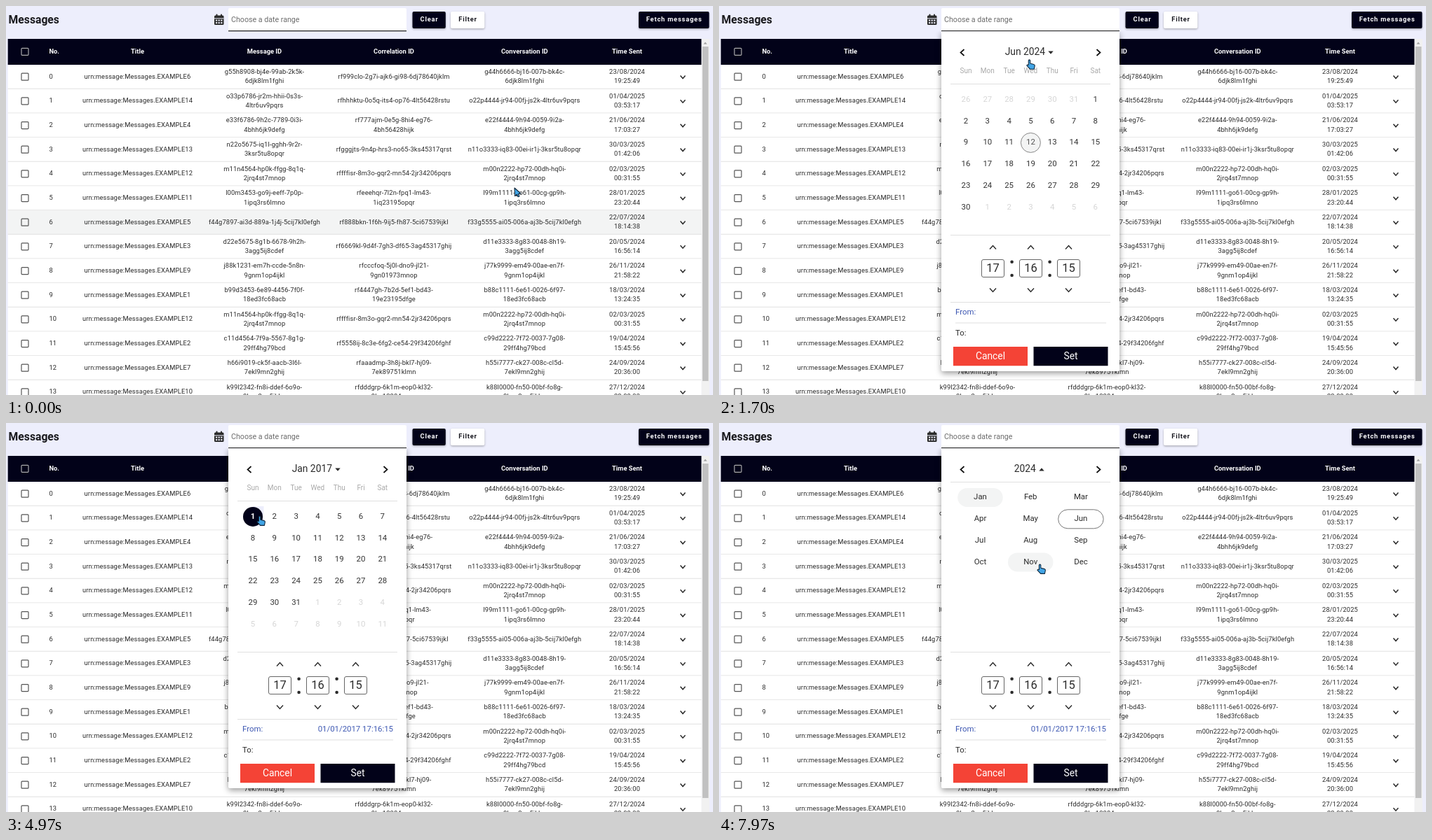
An HTML page with a canvas that plays this animation: 1008 by 556 pixels, repeating every 8 s.

```html
<!DOCTYPE html>
<html lang="en">
<head>
<meta charset="utf-8">
<title>Messages</title>
<style>
html, body { margin: 0; width: 100%; height: 100%; overflow: hidden; background: #edeefc; }
canvas { display: block; }
</style>
</head>
<body>
<canvas id="stage" width="1008" height="556"></canvas>
<script>
const ctx = document.getElementById('stage').getContext('2d');
const LOOP = 8000, NAVY = '#020219', INK = '#2b2b2b', SOFT = '#f3f4f4', LAVENDER = '#edeefc', RULE = '#e0e0e0';
const ROW = 104 / 3, TOP = 84, LEFT = 2.67, WIDTH = 989;

// number, message id, correlation id, conversation id, time; "|" breaks a line
const rows = `6,g55h8908-bj4e-99ab-2k5k-|6djk8lm1fghi,rf999clo-2g7i-ajk6-gi98-6dj78640jklm,g44h6666-bj16-007b-bk4c-|6djk8lm1fghi,23/08/2024|19:25:49
14,o33p6786-jr2m-hhii-0s3s-|4ltr6uv9pqrs,rfhhhktu-0o5q-its4-op76-4lt56428rstu,o22p4444-jr94-00fj-js2k-4ltr6uv9pqrs,01/04/2025|03:53:17
4,e33f6786-9h2c-7789-0i3i-|4bhh6jk9defg,rf777ajm-0e5g-8hi4-eg76-|4bh56428hijk,e22f4444-9h94-0059-9i2a-|4bhh6jk9defg,21/06/2024|17:03:27
13,n22o5675-iq1l-gghh-9r2r-|3ksr5tu8opqr,rfgggjts-9n4p-hrs3-no65-3ks45317qrst,n11o3333-iq83-00ei-ir1j-3ksr5tu8opqr,30/03/2025|01:42:06
12,m11n4564-hp0k-ffgg-8q1q-|2jrq4st7mnop,rffffisr-8m3o-gqr2-mn54-2jr34206pqrs,m00n2222-hp72-00dh-hq0i-|2jrq4st7mnop,02/03/2025|00:31:55
11,l00m3453-go9j-eeff-7p0p-|1ipq3rs6lmno,rfeeehqr-7l2n-fpq1-lm43-|1iq23195opqr,l99m1111-go61-00cg-gp9h-|1ipq3rs6lmno,28/01/2025|23:20:44
5,f44g7897-ai3d-889a-1j4j-5cij7kl0efgh,rf888bkn-1f6h-9ij5-fh87-5ci67539ijkl,f33g5555-ai05-006a-aj3b-5cij7kl0efgh,22/07/2024|18:14:38
3,d22e5675-8g1b-6678-9h2h-|3agg5ij8cdef,rf6669kl-9d4f-7gh3-df65-3ag45317ghij,d11e3333-8g83-0048-8h19-|3agg5ij8cdef,20/05/2024|16:56:14
9,j88k1231-em7h-ccde-5n8n-|9gnm1op4ijkl,rfcccfoq-5j0l-dno9-jl21-|9gn01973mnop,j77k9999-em49-00ae-en7f-|9gnm1op4ijkl,26/11/2024|21:58:22
1,b99d3453-6e89-4456-7f0f-|18ed3fc68acb,rf4447gh-7b2d-5ef1-bd43-|19e23195dfge,b88c1111-6e61-0026-6f97-|18ed3fc68acb,18/03/2024|13:24:35
12,m11n4564-hp0k-ffgg-8q1q-|2jrq4st7mnop,rffffisr-8m3o-gqr2-mn54-2jr34206pqrs,m00n2222-hp72-00dh-hq0i-|2jrq4st7mnop,02/03/2025|00:31:55
2,c11d4564-7f9a-5567-8g1g-|29ff4hg79bcd,rf5558ij-8c3e-6fg2-ce54-29f34206fghf,c99d2222-7f72-0037-7g08-|29ff4hg79bcd,19/04/2024|15:45:56
7,h66i9019-ck5f-aacb-3l6l-|7ekl9mn2ghij,rfaaadmp-3h8j-bkl7-hj09-|7ek89751klmn,h55i7777-ck27-008c-cl5d-|7ekl9mn2ghij,24/09/2024|20:36:00
10,k99l2342-fn8i-ddef-6o9o-|0hon2pq5jklm,rfdddgrp-6k1m-eop0-kl32-|0ho12084nopq,k88l0000-fn50-00bf-fo8g-|0hon2pq5jklm,27/12/2024|22:09:33`
  .split('\n').map(line => line.split(','));

// pointer path: time, x, y
const path = [[-60, 728, 305], [0, 725, 260], [420, 445, 14], [830, 440, 24], [1030, 433, 46], [1300, 434, 66],
  [1670, 441, 68], [1850, 452, 180], [2050, 528, 150], [2300, 460, 92], [2470, 417, 70], [2700, 417, 70],
  [3050, 470, 180], [3300, 446, 138], [3700, 446, 138], [3970, 408, 110], [4150, 374, 106], [4500, 372, 110],
  [4830, 361, 133], [5200, 361, 133], [5550, 476, 74], [5930, 500, 339], [6070, 500, 339], [6370, 481, 74],
  [6470, 470, 72], [6680, 470, 72], [7270, 502, 188], [7500, 502, 188], [7970, 457, 202], [8000, 456, 202]];

// start, view, year, month index
const views = [[0, 'days', 2024, 5], [2570, 'years', 2024, 5], [3430, 'months', 2017, 5],
  [4200, 'days', 2017, 0], [6630, 'years', 2017, 0], [7500, 'months', 2024, 0]];
const PICK_TIME = 4970, OPEN_TIME = 480;
const monthNames = 'Jan Feb Mar Apr May Jun Jul Aug Sep Oct Nov Dec'.split(' ');

const arrow = new Path2D('M0 0L9 8L5.3 8.6L7 12L5 12.8L3.3 9.3L.5 11.6Z');
const handShape = new Path2D('M-.6 1Q.5-.8 1.8 1V5.2L7 6.6Q8.8 7.2 8.3 9L7.4 13.4H1.6L-3 8.4Q-2.8 6.6-.6 7.6Z');

let pointer, hover, hand;

const clamp = v => Math.max(0, Math.min(1, v));
const smooth = p => p * p * (3 - 2 * p);
const hit = (p, x, y, w, h) => Math.abs(p.x - x) <= w / 2 && Math.abs(p.y - y) <= h / 2;

function pointerAt(t) {
  const i = Math.max(1, path.findIndex(k => k[0] >= t));
  const [t0, x0, y0] = path[i - 1], [t1, x1, y1] = path[i];
  const p = smooth(clamp((t - t0) / (t1 - t0)));
  return { x: x0 + (x1 - x0) * p, y: y0 + (y1 - y0) * p };
}

function text(s, x, y, size, color = INK, align = 'center', weight = 400, gap = 0) {
  ctx.font = `${weight} ${size}px Roboto, sans-serif`;
  ctx.letterSpacing = gap + 'px';
  ctx.textAlign = align;
  ctx.fillStyle = color;
  ctx.fillText(s, x, y);
}

function box(x, y, w, h, fill, r = 0, stroke, width = 1) {
  ctx.beginPath();
  ctx.roundRect(x, y, w, h, r);
  if (fill) { ctx.fillStyle = fill; ctx.fill(); }
  if (stroke) { ctx.strokeStyle = stroke; ctx.lineWidth = width; ctx.stroke(); }
}

function shadowBox(x, y, w, h, fill, r, blur, dy, alpha) {
  ctx.save();
  ctx.shadowColor = `rgba(0,0,0,${alpha})`;
  ctx.shadowBlur = blur;
  ctx.shadowOffsetY = dy;
  box(x, y, w, h, fill, r);
  ctx.restore();
}

// the longer side decides whether it points along x or y, the sign decides the direction
function chevron(x, y, w, h, width = 1.5, color = INK) {
  ctx.beginPath();
  ctx.moveTo(x - w / 2, y - h / 2);
  if (Math.abs(w) < Math.abs(h)) {
    ctx.lineTo(x + w / 2, y);
    ctx.lineTo(x - w / 2, y + h / 2);
  } else {
    ctx.lineTo(x, y + h / 2);
    ctx.lineTo(x + w / 2, y - h / 2);
  }
  ctx.strokeStyle = color;
  ctx.lineWidth = width;
  ctx.stroke();
}

function button(label, x, w, fill, color) {
  shadowBox(x, 8, w, 24, fill, 2, 3, 1.3, .3);
  text(label, x + w / 2 + .4, 19.7, 9.33, color, 'center', 700, .8);
}

function drawToolbar() {
  text('Messages', 3.6, 20, 15.7, '#1a1a1e', 'left', 700);
  box(299.5, 11.5, 2, 4, INK, 1);
  box(306, 11.5, 2, 4, INK, 1);
  box(297, 13.5, 13.5, 13.5, INK, 1.5);
  box(297, 17.3, 13.5, 1, LAVENDER);
  for (let i = 0; i < 6; i++) box(299 + i % 3 * 3.6, 19.6 + (i / 3 | 0) * 3.5, 2.2, 2, LAVENDER);
  box(317, 3, 254, 33, '#fff', [2, 2, 0, 0]);
  box(317, 35, 254, 1.3, '#222');
  text('Choose a date range', 321, 19.5, 10.67, '#6c6c6c', 'left');
  button('Clear', 579.5, 47.3, NAVY, '#fff');
  button('Filter', 634, 48.3, '#fff', '#16161e');
  button('Fetch messages', 902, 100.5, NAVY, '#fff');
}

function drawTable(active) {
  const centers = [187.5, 368.5, 553, 739.3, 885.5];
  box(LEFT, 47, WIDTH, 509, '#fff');
  box(LEFT, 47, WIDTH, 37, NAVY);
  box(22, 60.3, 10, 10, null, 1, '#aaa', 1.2);
  text('No.', 61.5, 65, 9.33, '#fff', 'left', 700);
  ['Title', 'Message ID', 'Correlation ID', 'Conversation ID', 'Time Sent']
    .forEach((s, i) => text(s, centers[i], 65, 9.33, '#fff', 'center', 700));
  rows.forEach(([id, ...cells], i) => {
    const y = TOP + ROW * i, mid = y + 17;
    if (i === active) box(LEFT, y, WIDTH, ROW, SOFT);
    box(LEFT, y + ROW - .8, WIDTH, .8, RULE);
    box(22, mid - 4.8, 10, 10, null, 1, '#555', 1.2);
    text(i, 61.5, mid, 9.33, INK, 'left', 400, .13);
    ['urn:message:Messages.EXAMPLE' + id, ...cells].forEach((cell, c) => {
      const lines = cell.split('|');
      lines.forEach((s, n) => text(s, centers[c], mid + (n - (lines.length - 1) / 2) * 13.33, 9.33, INK, 'center', 400, .13));
    });
    chevron(965, mid + .5, 7, 4);
  });
  box(LEFT + WIDTH, 47, 11.3, 509, '#f1f1f1');
  box(993, 58, 8.5, 478, '#c1c1c1');
  ctx.fillStyle = '#a0a0a0';
  ctx.fill(new Path2D('M994.5 54.5L997 51.5L999.5 54.5Z'));
}

function cell(label, x, y, w, h, { fill, stroke, color = INK, weight } = {}) {
  hand ||= hit(pointer, x, y, w, h);
  fill ||= hit(hover, x, y, w, h) && SOFT;
  if (fill || stroke) box(x - w / 2, y - h / 2 + .5, w, h, fill, h / 2, stroke);
  text(label, x, y, 11.4, color, 'center', weight);
}

function drawDays(year, month, picked) {
  const lead = new Date(year, month, 1).getDay();
  ['Sun', 'Mon', 'Tue', 'Wed', 'Thu', 'Fri', 'Sat'].forEach((s, i) => text(s, 352 + 30.8 * i, 93, 10, '#a9a9a9'));
  box(330, 111, 228, 1, RULE);
  if (picked) box(352, 119, 15.5, 29, LAVENDER);
  for (let i = 0; i < 42; i++) {
    const date = new Date(year, month, 1 - lead + i), day = date.getDate();
    const inside = date.getMonth() === month;
    const today = year === 2024 && inside && day === 12;
    let look = { color: inside ? '#333' : '#d6d6d6' };
    if (today) look = { color: '#555', fill: SOFT, stroke: '#888' };
    if (picked && inside && day === 1) look = { color: '#fff', fill: NAVY, weight: 700 };
    cell(day, 352 + 30.8 * (i % 7), 133.4 + 30.75 * (i / 7 | 0), 28, 28, look);
  }
}

function drawMonths(year, month) {
  box(330, 84, 228, 1, RULE);
  monthNames.forEach((s, i) => cell(s, 372.5 + 71.7 * (i % 3), 106 + 30.8 * (i / 3 | 0), 64.5, 27, {
    fill: i === month && SOFT, stroke: year === 2024 && i === 5 && '#777' }));
}

function drawYears(year) {
  text('2016 - 2036', 358, 114, 14, '#999', 'left', 700);
  for (let i = 0; i < 21; i++) {
    const y = 2016 + i;
    cell(y, 386 + 58 * (i % 3), 137.6 + 24.8 * (i / 3 | 0), 51.5, 21.5, {
      fill: y === year && SOFT, stroke: y === 2024 && '#777' });
  }
}

function drawHeader(t, index) {
  const [since, view, year, month] = views[index];
  const days = view === 'days', years = view === 'years';
  const pressed = years ? 1 - clamp((t - since - 100) / 150) : 0;
  if (pressed) box(414, 56.5, 61, 20, `rgba(0,0,0,${.12 * pressed})`, 1.5);
  text(days ? `${monthNames[month]} ${year}` : year, 436.3, 66, 13.8);
  hand ||= hit(pointer, 444, 67, 80, 22);

  const wasDays = index === 0 || views[index - 1][1] === 'days';
  const turn = clamp((t - since) / 200);
  const angle = days ? (index ? 1 - turn : 0) : wasDays ? turn : 1;
  ctx.save();
  ctx.translate(days ? 473 : 460, 66.5);
  ctx.rotate(Math.PI * angle);
  ctx.fillStyle = INK;
  ctx.fill(new Path2D('M-3.7 -2H3.7L0 2.2Z'));
  ctx.restore();

  const y = years ? 201.5 : 66.5;
  chevron(347, y, -5, 9, 1.7, '#111');
  chevron(541, y, 5, 9, 1.7, '#111');
}

function drawTimer() {
  box(330, 327, 228, 1, RULE);
  [17, 16, 15].forEach((n, i) => {
    const x = 390.5 + 54 * i;
    chevron(x, 345, 9, -5, 1.4);
    chevron(x, 406, 9, 5, 1.4);
    box(x - 16, 362.5, 32, 25, '#fff', 2.5, '#666');
    text(n, x, 375, 16.5);
    hand ||= hit(pointer, x, 345, 22, 16);
    if (i < 2) for (const y of [363.5, 382.7]) box(x + 24.8, y, 4.6, 4.6, INK, 2.3);
  });
}

function drawPicker(t) {
  const p = clamp((t - OPEN_TIME) / 400);
  if (!p) return;
  ctx.save();
  ctx.globalAlpha = clamp(p * 3);
  ctx.beginPath();
  ctx.rect(300, 36.3, 290, 520);
  ctx.clip();
  ctx.translate(0, 36);
  ctx.scale(1, 1 - (1 - p) ** 3);
  shadowBox(317, 0, 254, 486, '#fff', [0, 0, 2, 2], 9, 3, .4);
  ctx.restore();

  ctx.save();
  ctx.globalAlpha = clamp((t - 830) / 300);
  const index = views.findLastIndex(v => t >= v[0]);
  const [, view, year, month] = views[index], picked = t >= PICK_TIME;
  drawHeader(t, index);
  if (view === 'days') drawDays(year, month, picked);
  else if (view === 'months') drawMonths(year, month);
  else drawYears(year);
  drawTimer();
  box(330, 423, 228, 1, RULE);
  text('From:', 337, 437.5, 11.4, '#3f59b3', 'left');
  if (picked) text('01/01/2017 17:16:15', 552, 437.5, 11.4, '#3f59b3', 'right');
  box(337, 452.5, 215, 1, RULE);
  text('To:', 337, 467.5, 11.4, INK, 'left');
  box(334, 487, 106, 27.3, '#f44336');
  box(448.5, 487, 106, 27.3, NAVY);
  text('Cancel', 387, 500.5, 13.8, '#fff');
  text('Set', 501.5, 500.5, 13.8, '#fff');
  ctx.restore();
}

function drawPointer() {
  const shape = hand ? handShape : arrow;
  ctx.save();
  ctx.translate(pointer.x, pointer.y);
  ctx.lineJoin = 'round';
  ctx.fillStyle = '#42a5e6';
  ctx.strokeStyle = '#12283c';
  ctx.lineWidth = 1.1;
  ctx.fill(shape);
  ctx.stroke(shape);
  ctx.restore();
}

function frame() {
  const t = performance.now() % LOOP;
  pointer = pointerAt(t);
  hover = pointerAt(t - 50);
  hand = false;
  ctx.textBaseline = 'middle';
  ctx.fillStyle = LAVENDER;
  ctx.fillRect(0, 0, 1008, 556);
  drawToolbar();
  drawTable(t < OPEN_TIME ? Math.floor((hover.y - TOP) / ROW) : -1);
  drawPicker(t);
  drawPointer();
  requestAnimationFrame(frame);
}
frame();
</script>
</body>
</html>
```
